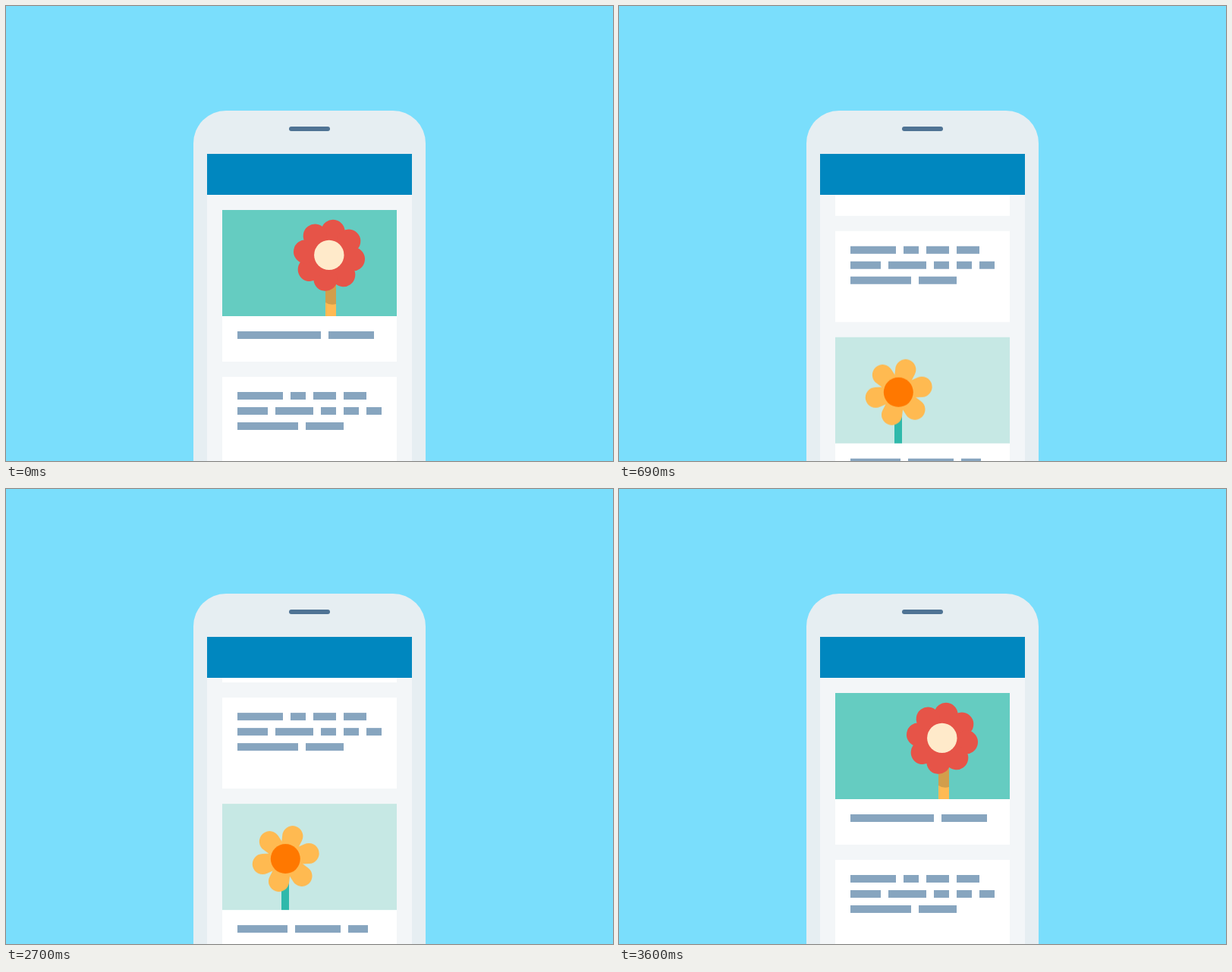
Recreate the animation shown at these times as an HTML page. Size 800 by 600 pixels, loop 4.5 s.

```html
<!DOCTYPE html>
<html lang="en">
<head>
<meta charset="utf-8">
<title>Phone feed</title>
<style>
  html, body { margin: 0; width: 100%; height: 100%; overflow: hidden; background: #7adefc; }
  svg { display: block; width: 800px; height: 600px; }
</style>
</head>
<body>
<svg viewBox="0 0 800 600">
  <defs>
    <clipPath id="screen"><rect x="265" y="249" width="270" height="351"/></clipPath>
    <clipPath id="stem"><rect x="421" y="350" width="14" height="59"/></clipPath>
  </defs>

  <rect x="247" y="138" width="306" height="540" rx="43" fill="#e6eef2"/>
  <rect x="373" y="159" width="54" height="6" rx="3" fill="#4f7394"/>
  <rect x="265" y="249" width="270" height="351" fill="#f3f6f8"/>

  <g clip-path="url(#screen)">
    <g id="feed">
      <g fill="#fff">
        <rect x="285" y="269" width="230" height="200"/>
        <rect x="285" y="489" width="230" height="120"/>
        <rect x="285" y="629" width="230" height="200"/>
      </g>
      <g id="bars" fill="#87a5bf"></g>

      <rect x="285" y="269" width="230" height="140" fill="#65ccc1"/>
      <rect x="421" y="350" width="14" height="59" fill="#ffba53"/>
      <g clip-path="url(#stem)" fill="#d29e4b">
        <rect x="421" y="350" width="14" height="28"/>
        <circle cx="430" cy="378" r="15.7"/>
      </g>
      <g transform="translate(426 328.8)">
        <g id="red" fill="#e65448"><circle r="30"/></g>
        <circle cx="-.2" cy="-.4" r="19.7" fill="#ffeaca"/>
      </g>

      <rect x="285" y="629" width="230" height="140" fill="#c6e8e4"/>
      <rect x="363" y="715" width="10" height="54" fill="#2fb9ab"/>
      <g transform="translate(368.7 701.5)">
        <g id="yellow" fill="#ffba51"></g>
        <circle cx="-.4" cy=".1" r="19.5" fill="#ff7800"/>
      </g>
    </g>
  </g>

  <rect x="265" y="195" width="270" height="54" fill="#0087bf"/>
</svg>

<script>
  const $ = id => document.getElementById(id);

  function add(parent, tag, attrs) {
    const el = document.createElementNS(parent.namespaceURI, tag);
    for (const key in attrs) el.setAttribute(key, attrs[key]);
    parent.append(el);
  }

  // Each row: top edge, then word widths separated by 10px gaps.
  const rows = [
    [429, 110, 60],
    [509, 60, 20, 30, 30],
    [529, 40, 50, 20, 20, 20],
    [549, 80, 50],
    [789, 66, 60, 26]
  ];
  for (const [y, ...widths] of rows) {
    let x = 305;
    for (const width of widths) {
      add($('bars'), 'rect', { x, y, width, height: 10 });
      x += width + 10;
    }
  }

  function petals(parent, count, tilt, tag, shape) {
    for (let i = 0; i < count; i++) {
      add(parent, tag, { ...shape, transform: `rotate(${tilt + i * 360 / count})` });
    }
  }
  petals($('red'), 8, 9, 'circle', { cy: -31.8, r: 15.6 });
  petals($('yellow'), 6, 17, 'path', {
    d: 'M-8 0L-13.3 -28.3A13.6 13.6 0 1 1 13.3 -28.3L8 0Z'
  });

  const loop = 4500, travel = 652, distance = 214;
  const ease = 'cubic-bezier(.21, 0, .165, 1)';
  const steps = [
    [0, 0],
    [300, 0, ease],
    [300 + travel, distance],
    [2696, distance, ease],
    [2696 + travel, 0],
    [loop, 0]
  ];
  $('feed').animate(
    steps.map(([time, y, easing = 'linear']) => ({
      offset: time / loop,
      transform: `translateY(${-y}px)`,
      easing
    })),
    { duration: loop, iterations: Infinity }
  );
</script>
</body>
</html>
```
